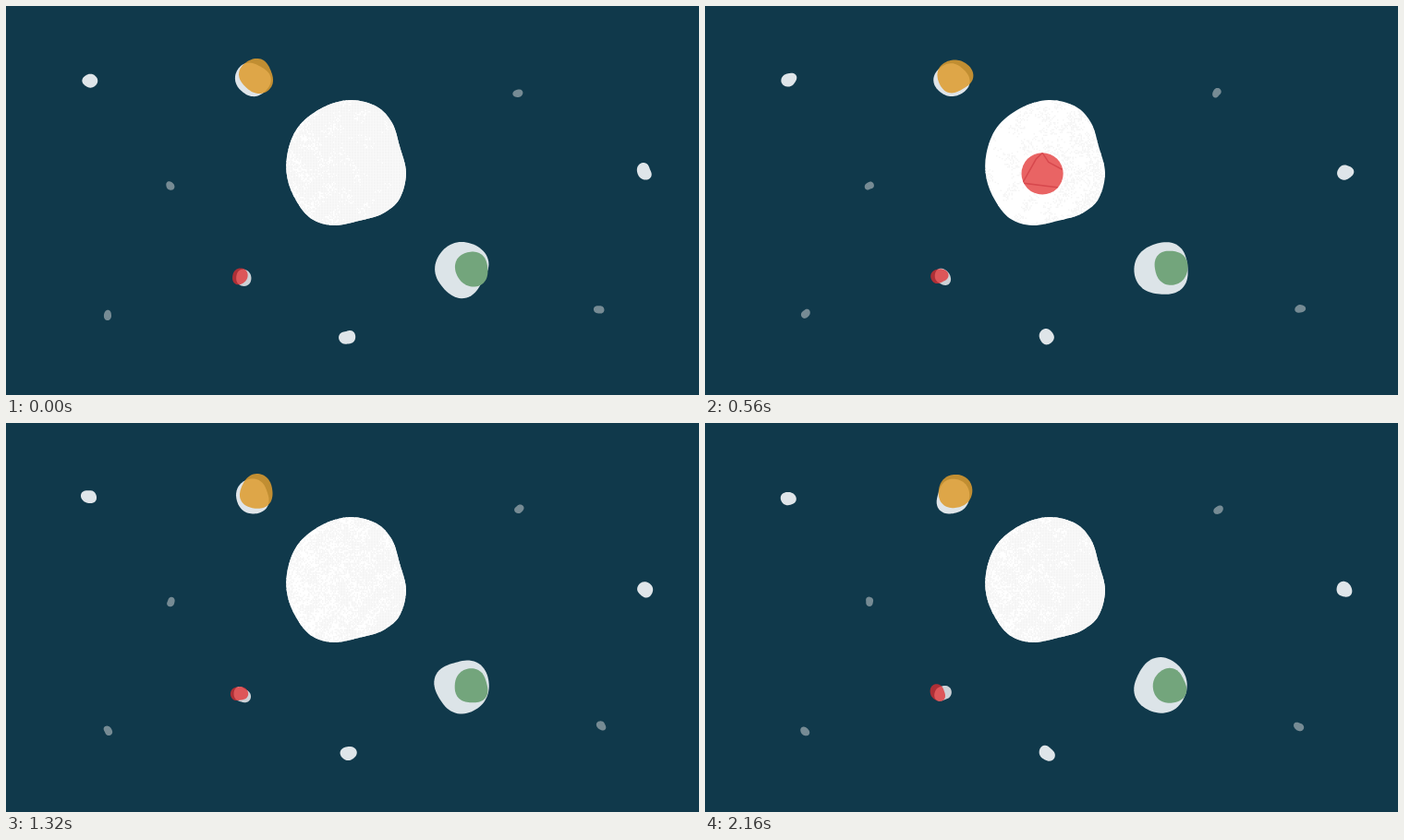
Write an HTML page with a canvas that moves like this. It is 750 by 422 pixels and loops after 2240 ms.

```html
<!DOCTYPE html>
<html lang="en">
<head>
<meta charset="utf-8">
<title>Planets</title>
<style>
  html, body { margin: 0; width: 100%; height: 100%; overflow: hidden; background: #10394b; }
  canvas { display: block; width: 750px; height: 422px; }
</style>
</head>
<body>
<canvas id="stage" width="750" height="422"></canvas>
<script>
const ctx = document.getElementById('stage').getContext('2d');
const LOOP = 2240, BOIL = 120, TAU = Math.PI * 2;
const BACK = '#10394b', PALE = '#dfe5e9', DIM = '#768b94';

const rand = n => {
  const v = Math.sin(n * 127.1 + 11.7) * 43758.5453;
  return v - Math.floor(v);
};
const mix = (a, b, k) => a + (b - a) * k;

const stones = [
  { x: 90.5, y: 81, r: 7.8, fill: PALE },
  { x: 554.5, y: 94, r: 4.8, fill: DIM },
  { x: 691.8, y: 180.3, r: 8.4, fill: PALE },
  { x: 179, y: 194, r: 4.6, fill: DIM },
  { x: 109.2, y: 334.3, r: 4.8, fill: DIM },
  { x: 369.4, y: 359.5, r: 8.2, fill: PALE },
  { x: 643, y: 328.6, r: 5, fill: DIM },
  { x: 256.2, y: 294.2, r: 8.7, fill: '#cdd2d7' },
  { x: 252.7, y: 292.4, r: 8.6, fill: 'rgba(225,44,47,.75)' },
  { x: 268, y: 80.7, r: 18.4, fill: PALE },
  { x: 270.3, y: 75.3, r: 18.4, fill: 'rgba(223,156,46,.86)' },
  { x: 494.2, y: 284.9, r: 29.2, fill: '#dce4e8' },
  { x: 504, y: 284.4, r: 18.5, fill: '#73a57c' }
];

// Each boil step redraws a stone with fresh lobes and a slight shift.
function drawStone({ x, y, r, fill }, id, slot) {
  let seed = id * 57 + slot * 13;
  const next = (lo, hi) => mix(lo, hi, rand(++seed));
  const cx = x + next(-1.3, 1.3), cy = y + next(-1.3, 1.3);
  const lobes = [
    [2, Math.min(.17, next(.4, 1.3) / r), next(0, TAU)],
    [3, next(.015, .045), next(0, TAU)],
    [4, next(.01, .025), next(0, TAU)]
  ];
  ctx.fillStyle = fill;
  ctx.beginPath();
  for (let a = 0; a < TAU; a += TAU / 72) {
    const d = lobes.reduce((sum, [n, amp, turn]) => sum + amp * Math.cos(n * a + turn), 1) * r;
    ctx.lineTo(cx + d * Math.cos(a), cy + d * Math.sin(a));
  }
  ctx.fill();
}

function smoothLoop(pts) {
  const path = new Path2D(), n = pts.length, at = i => pts[(i + n) % n];
  path.moveTo(...pts[0]);
  for (let i = 0; i < n; i++) {
    const [p, q, r, s] = [at(i - 1), at(i), at(i + 1), at(i + 2)];
    path.bezierCurveTo(q[0] + (r[0] - p[0]) / 6, q[1] + (r[1] - p[1]) / 6,
      r[0] - (s[0] - q[0]) / 6, r[1] - (s[1] - q[1]) / 6, r[0], r[1]);
  }
  return path;
}

const planet = smoothLoop([[372, 102], [401, 109], [418, 127], [426, 152], [433, 181], [426, 209], [408, 225],
  [382, 233], [354, 238], [330, 230.5], [314, 211], [304.5, 187], [304.5, 160], [316, 131.5], [341, 111]]);

// Share of grey grain on the planet over time
const shades = [[0, .78], [240, .78], [560, .3], [800, .85], [1040, .9], [1680, .15], [LOOP, .78]];

function shadeAt(t) {
  const i = shades.findIndex(([end]) => t < end);
  const [t0, a] = shades[i - 1], [t1, b] = shades[i];
  return mix(a, b, (t - t0) / (t1 - t0));
}

const GRAIN = 1.5, grains = [];
for (let y = 102; y < 238; y += GRAIN) {
  for (let x = 303; x < 433; x += GRAIN) {
    const cloud = .5 + .25 * Math.sin(x * .21 + 3 * Math.sin(y * .06)) + .25 * Math.sin(y * .19 + 2 * Math.sin(x * .11));
    const slope = (x - 368) / 65 * .15;
    grains.push([x, y, .65 * rand(x * 3.7 + y * 91.3) + .35 * cloud - slope]);
  }
}

function drawPlanet(t) {
  const shade = shadeAt(t);
  ctx.fillStyle = '#fff';
  ctx.fill(planet);
  ctx.save();
  ctx.clip(planet);
  ctx.fillStyle = '#f5f5f5';
  for (const [x, y, level] of grains) {
    if (level < shade) ctx.fillRect(x, y, GRAIN, GRAIN);
  }
  ctx.restore();
}

// The disc circles the planet: quick at the edges, slow across the front.
function discAt(t) {
  const u = (t - 640) / 400;
  const turn = (7.5 + 31 * u + 45.5 * u ** 3) * Math.PI / 180;
  const sin = Math.sin(turn), cos = Math.cos(turn);
  const reach = 66 * (1 + .3 * Math.min(0, cos));
  return {
    x: 364 + reach * sin,
    y: 163 + 19 * cos - 6 * sin,
    rx: Math.max(1, 22.6 * Math.abs(cos)),
    ry: 20.5 + 2.2 * cos,
    front: cos > .15
  };
}

function drawDisc({ x, y, rx, ry, front }) {
  const fold = [[.95, -.2], [.3, -.55], [0, -1], [-.3, -.7], [-.95, .45], [.8, .66]];
  ctx.save();
  ctx.beginPath();
  ctx.ellipse(x, y, rx, ry, 0, 0, TAU);
  ctx.fillStyle = front ? '#e96464' : '#5c1014';
  ctx.fill();
  ctx.clip();
  ctx.lineWidth = 1.5;
  ctx.strokeStyle = front ? '#d7484d' : '#1c0b0f';
  ctx.beginPath();
  fold.forEach(([px, py]) => ctx.lineTo(x + px * rx, y + py * ry));
  ctx.stroke();
  ctx.restore();
}

function draw(t) {
  const slot = Math.floor(t / BOIL);
  ctx.fillStyle = BACK;
  ctx.fillRect(0, 0, 750, 422);
  stones.forEach((stone, id) => drawStone(stone, id, slot));
  const disc = t >= 80 && t <= 1120 ? discAt(t) : null;
  if (disc && !disc.front) drawDisc(disc);
  drawPlanet(t);
  if (disc && disc.front) drawDisc(disc);
}

const start = performance.now();
let last = -1;
function tick() {
  const t = (performance.now() - start) % LOOP;
  const step = t < 1200 ? 40 : BOIL;
  const held = Math.floor(t / step) * step;
  if (held !== last) draw(last = held);
  requestAnimationFrame(tick);
}
tick();
</script>
</body>
</html>
```
